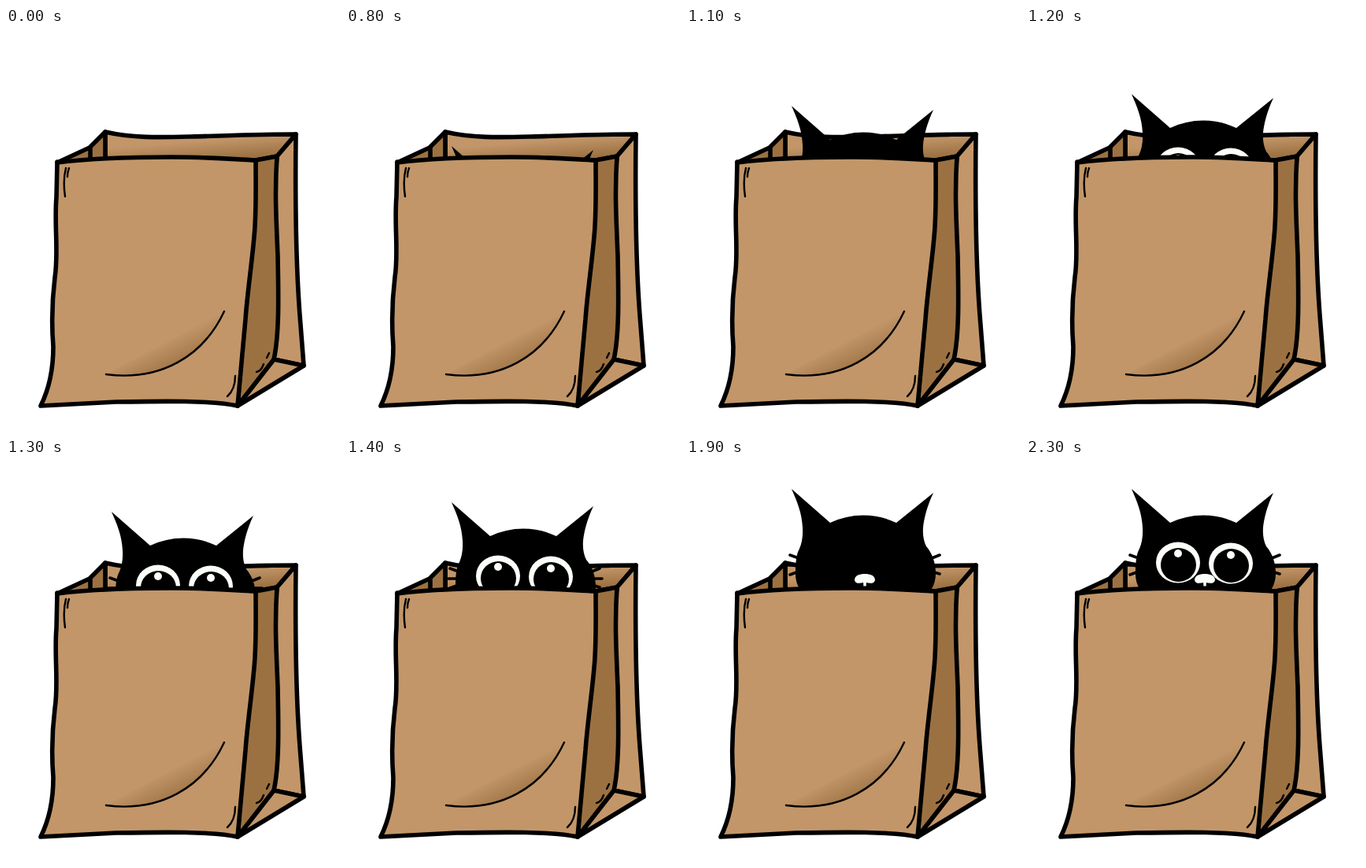
An HTML page that plays this animation: 424 px wide and 512 px high, repeating every 3800 ms.

```html
<!DOCTYPE html>
<html lang="en">
<head>
<meta charset="utf-8">
<title>Cat in a bag</title>
<style>
  html, body { margin: 0; width: 100%; height: 100%; overflow: hidden; background: #fff; }
  svg { display: block; width: 100%; height: 100%; }
  .ink { stroke: #000; stroke-width: 5.6; stroke-linejoin: round; stroke-linecap: round; }
  .thin { fill: none; stroke: #000; stroke-width: 2.4; stroke-linecap: round; }
  .paper { fill: #c29669; }
  .shade { fill: #9c7142; }
  .white { fill: #fbfff9; }
</style>
</head>
<body>
<svg viewBox="0 0 424 512">
  <defs>
    <linearGradient id="inside" gradientUnits="userSpaceOnUse" x1="240" y1="144" x2="242" y2="169">
      <stop offset="0" stop-color="#c29669"/>
      <stop offset="1" stop-color="#9c7142"/>
    </linearGradient>
    <linearGradient id="crease" gradientUnits="userSpaceOnUse" x1="201" y1="398" x2="219" y2="434">
      <stop offset="0" stop-color="#c29669"/>
      <stop offset="1" stop-color="#9c7142"/>
    </linearGradient>
  </defs>

  <!-- inside of the bag -->
  <path class="ink" fill="url(#inside)" d="M126 132C160 140 195 139 235 138S320 135 368 135L344 163L317 168L126 170Z"/>
  <path class="ink shade" d="M65 171L106 152L126 132V170H65M107 152V170"/>

  <g id="cat">
    <path d="M134 38L183 81Q203 71.500 225 71.500T267 81L314 43C306 60 302 76 301 87Q300 101 305 111C313 120 317 133 317 146C317 215 139 215 139 146C139 131 140 121 144 114Q149 102 148 87C147 68 141 54 134 38Z"/>
    <path fill="none" stroke="#000" stroke-width="3.6" stroke-linecap="round" d="M132 122L143 126M130 135H142M132 147L143 143M322 122L312 126M325 135H312M322 146L312 143"/>
    <path class="white" d="M214 154C214 148 220 146 227 146S240 148 240 154C239 159 233 158 229 157Q228 161 230 168H224Q226 161 225 157C221 158 215 159 214 154Z"/>
    <g id="eyes">
      <ellipse class="white" cx="193" cy="131.500" rx="28" ry="26"/>
      <ellipse cx="193.500" cy="134.500" rx="22.500" ry="21.500"/>
      <circle class="white" cx="193" cy="120" r="5"/>
      <ellipse class="white" cx="260" cy="132.500" rx="28" ry="26"/>
      <ellipse cx="260.500" cy="135.500" rx="22.500" ry="21.500"/>
      <circle class="white" cx="260" cy="122" r="5"/>
    </g>
  </g>

  <!-- outside of the bag -->
  <path class="ink paper" d="M344 163L368 135C367 220 368 300 373 365L378 429L340 421L330 300Z"/>
  <path class="ink paper" d="M340 421L378 429L294 480Z"/>
  <path class="ink shade" d="M317 168L344 163C341 210 343 240 345 290C346 340 347 390 340 421L294 480Z"/>
  <path class="ink paper" d="M65 171C110 165 160 164 210 164S290 167 317 168C317 200 318 235 315 265C312 300 306 340 304 370L294 480C262 473 200 474 140 475L44 480C55 458 60 430 60 405C58 380 58 350 62 317C67 285 61 250 64 215Z"/>
  <path fill="url(#crease)" d="M127 440C195 449 250 418 277 360Z"/>
  <path class="thin" d="M127 440C195 449 250 418 277 360M76 178Q72 194 75 214M80 178Q78 183 78 189M291 442Q291 459 281 468M318 437Q324 436 327 427M331 419L334 413"/>
</svg>
<script>
  const LOOP = 3800, RISE_START = 800, STEP = 100;
  const drops = [112, 94, 76, 61, 46, 29, 17, 0];
  const cat = document.getElementById("cat");
  const eyes = document.getElementById("eyes");
  const show = (el, on) => el.setAttribute("visibility", on ? "inherit" : "hidden");

  function draw(t) {
    const step = Math.floor((t - RISE_START) / STEP);
    const drop = drops[Math.max(0, Math.min(step, drops.length - 1))];
    show(cat, step >= 0);
    show(eyes, t < 1900 || t >= 2300);
    cat.setAttribute("transform", `translate(0 ${drop})`);
  }

  const start = performance.now();
  function tick() {
    draw((performance.now() - start) % LOOP);
    requestAnimationFrame(tick);
  }
  tick();
</script>
</body>
</html>
```
